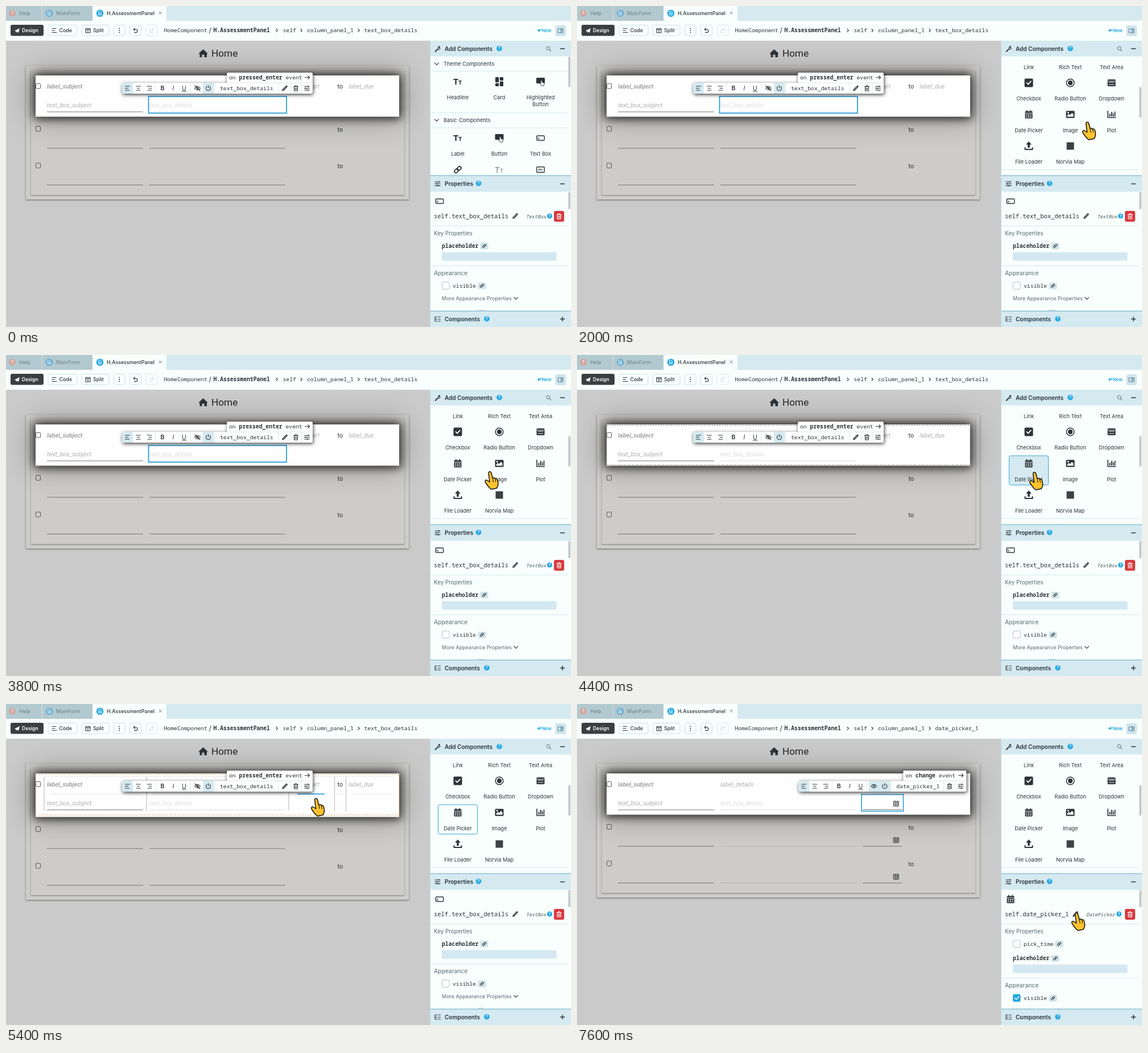
Write an HTML page that moves like this. It is 993 px wide and 564 px high and loops after 8 s.

```html
<!DOCTYPE html>
<html lang="en">
<head>
<meta charset="utf-8">
<title>Form designer</title>
<style>
html,body{margin:0;width:100%;height:100%;overflow:hidden;background:#cacacb}
svg{display:block;width:100vw;height:100vh}
text{font-family:Inter,"Open Sans",sans-serif;font-size:9.2px;fill:#2d3337;white-space:pre}
.m{font-family:"Noto Sans Mono","DejaVu Sans Mono",monospace;font-size:9.75px}
.r{font-family:Roboto,sans-serif;font-size:10.85px}
.i{font-style:italic}
.b{font-weight:600}
.h{font-size:10px;font-weight:600;fill:#263238}
.c{text-anchor:middle}
.s{fill:none;stroke:#2d3337;stroke-width:1.1;stroke-linecap:round;stroke-linejoin:round}
.sh{filter:drop-shadow(1px 2px 3px rgba(0,0,0,.75))}
</style>
</head>
<body>
<svg id="stage" viewBox="0 0 993 564" preserveAspectRatio="none"></svg>
<script>
const INK = '#2d3337', BLUE = '#24a8e2', PALE = '#d5e9f1', PAPER = '#f8fffd';

const text = (x, y, s, cls = '', extra = '') => `<text x="${x}" y="${y}" class="${cls}" ${extra}>${s}</text>`;
const rect = (x, y, w, h, fill, extra = '') => `<rect x="${x}" y="${y}" width="${w}" height="${h}" fill="${fill}" ${extra}/>`;
const line = (x1, y1, x2, y2, color, w = 1, extra = '') =>
  `<path d="M${x1} ${y1}L${x2} ${y2}" stroke="${color}" stroke-width="${w}" fill="none" ${extra}/>`;
const path = (d, extra = '') => `<path d="${d}" class="s" ${extra}/>`;
const solid = (d, fill = INK) => `<path d="${d}" fill="${fill}"/>`;
const disc = (x, y, r, fill, extra = '') => `<circle cx="${x}" cy="${y}" r="${r}" fill="${fill}" ${extra}/>`;
const group = (id, s, extra = '') => `<g id="${id}" ${extra}>${s}</g>`;
const size = n => `style="font-size:${n}px"`;
const tint = (c, n) => `style="fill:${c}${n ? `;font-size:${n}px` : ''}"`;

const bars = (a, b, c) => path(`M${a[0]} -3.5H${a[1]}M${b[0]} 0H${b[1]}M${c[0]} 3.5H${c[1]}`);
const hand = 'M-1 -3Q0 -4 1 -3L1.5 0L5 1.5Q5.5 4 4 6H0L-3 2Q-2.5 1 -1 2Z';
const letters = (color, weight) =>
  text(-8, 5, 'T', '', `style="font-size:13.5px;font-weight:${weight};fill:${color}"`) +
  text(1, 5, 'T', '', `style="font-size:9.5px;font-weight:${weight};fill:${color}"`);
const trash = path('M-4 -3H4M-1.5 -3V-4.5H1.5V-3M-3 -3V4.5H3V-3M-1 -.8V2.5M1 -.8V2.5');

const icons = {
  left: bars([-4, 4], [-4, 1], [-4, 3]),
  center: bars([-4, 4], [-2, 2], [-3.5, 3.5]),
  right: bars([-4, 4], [-1, 4], [-3, 4]),
  eye: path('M-5 0Q0 -6.5 5 0Q0 6.5 -5 0Z') + disc(0, 0, 1.6, 'none', 'class="s"'),
  power: path('M-2.6 -3A4 4 0 1 0 2.6 -3M0 -5V-.5'),
  pencil: solid('M-5 5L-4 1.5L2 -4.5Q4 -5.5 5 -3L-1.5 4Z') + line(-3, 2.5, 2.5, -3, '#fff', .8),
  trash,
  sliders: path('M-4.5 -3.3H4.5M-4.5 0H4.5M-4.5 3.3H4.5M2 -4.4V-2.2M-2 -1.1V1.1M1 2.2V4.4'),
  wrench: path('M-4.5 4.5L1 -1A3 3 0 0 1 4 -4.5L2.5 -2.5L4.5 -1Q3 2 0 1L-3.5 5Z'),
  tree: path('M-4.5 -4V3.5H-1M-4.5 0H-1M-4.5 -4H-1M1 -4H5M1 0H5M1 3.5H5'),
  chain: `<g transform="rotate(-42)">${rect(-7, -2.7, 7.6, 5.4, 'none', 'rx="2.7" class="s" style="stroke-width:1.8"')}${rect(-.6, -2.7, 7.6, 5.4, 'none', 'rx="2.7" class="s" style="stroke-width:1.8"')}</g>`,
  heading: letters(INK, 800),
  rich: letters('#7d8688', 500),
  cards: rect(-7, -8, 6.2, 9, INK, 'rx="1.3"') + rect(.8, -8, 6.2, 6, INK, 'rx="1.3"') +
    rect(-7, 2.5, 6.2, 5.5, INK, 'rx="1.3"') + rect(.8, -.5, 6.2, 8.5, INK, 'rx="1.3"'),
  button: rect(-7.5, -7, 15, 10, INK, 'rx="1.5"') +
    `<path d="${hand}" transform="translate(1.5,1)" fill="${PAPER}" stroke="${INK}" stroke-width=".9"/>`,
  box: rect(-6.7, -4, 13.4, 8, 'none', 'rx="1.2" class="s" style="stroke-width:1.4"') + path('M-4.3 -1V1.3H-2'),
  area: rect(-6.7, -4.7, 13.4, 9.4, 'none', 'rx="1" class="s" style="stroke-width:1.4"') +
    text(0, 1.5, 'abc', 'c b', size(5)),
  check: rect(-7.5, -7.5, 15, 15, INK, 'rx="2"') + path('M-3.5 0L-1 2.7L3.8 -2.7', 'style="stroke:#fff;stroke-width:1.8"'),
  radio: disc(0, 0, 6.8, 'none', `stroke="${INK}" stroke-width="1.5"`) + disc(0, 0, 4.2, INK),
  drop: rect(-7, -6, 14, 12, INK, 'rx="1.5"') + path('M-4.5 -1H4.5M-4.5 3H4.5', 'style="stroke:#fff"') + line(-7, -3, 7, -3, '#fff', .8),
  date: rect(-6.5, -5.5, 13, 12.5, INK, 'rx="1.3"') + line(-3.2, -7.5, -3.2, -4, INK, 1.8) + line(3.2, -7.5, 3.2, -4, INK, 1.8) +
    line(-6.5, -2.2, 6.5, -2.2, '#fff', 1) + line(-4.6, 1, 4.6, 1, '#fff', 1.9, 'stroke-dasharray="2 1.6"') + line(-4.6, 4.4, 4.6, 4.4, '#fff', 1.9, 'stroke-dasharray="2 1.6"'),
  image: rect(-7.5, -6.3, 15, 12.6, INK, 'rx="1.6"') + solid('M-5.5 4V2L-2.5 -1L-.5 1L3 -2.8L5.5 0V4Z', '#fff') + disc(-3.8, -3, 1.4, '#fff'),
  plot: path('M-6.5 -6V5.5H7', 'style="stroke-width:1.6"') + line(-3, 3.7, -3, -1, INK, 2) + line(.3, 3.7, .3, -4.5, INK, 2) +
    line(3.3, 3.7, 3.3, -2, INK, 1.6) + line(6, 3.7, 6, -5, INK, 1.6),
  upload: solid('M0 -8L5 -2.5H1.8V3H-1.8V-2.5H-5Z') + path('M-6.5 3V6H6.5V3', 'style="stroke-width:2"'),
  square: rect(-6.5, -6.5, 13, 13, '#3c4144'),
  spacer: path('M-7 -6.5H7M-7 6.5H7M0 -4V4M-2.5 -2L0 -4.5L2.5 -2M-2.5 2L0 4.5L2.5 2', 'style="stroke-width:1.7"'),
  shapes: solid('M0 -8L5 0H-5Z', '#9b9fa0') + disc(-4, 4, 3.4, '#b4b8b8') + rect(1, .5, 6.5, 6.5, INK),
  clock: disc(0, 0, 6.5, 'none', 'class="s"') + path('M0 -4V0L3 2'),
  grid: path('M-7 -6H7V6H-7ZM-7 -2H7M-7 2H7M-2 -6V6M2.5 -6V6'),
  rows: path('M-6 -6H6V-3H-6ZM-6 -1.5H6V1.5H-6ZM-6 3H6V6H-6Z'),
  calendar: rect(-4.3, -3.8, 8.6, 8.3, '#eee', 'class="s" style="fill:none;stroke-width:1"') + path('M-4 -1.6H4M-4 1.4H4M-1.4 -1.6V4.3M1.4 -1.6V4.3M-2.3 -5V-3M2.3 -5V-3', 'style="stroke-width:.9"')
};
const icon = (name, x, y, k = 1) => `<g transform="translate(${x},${y}) scale(${k})">${icons[name]}</g>`;
const help = (x, y, fill = BLUE, r = 4.8) => disc(x, y, r, fill) + text(x, y + 2.6, '?', 'c b', tint('#fff', 7.5));
const chip = (x, y) => rect(x - 7, y - 5.5, 14, 11.5, '#d0e3ea', 'rx="2.5"') + icon('chain', x, y, .52);
const chevron = (x, y) => path(`M${x - 3.5} ${y - 1.7}l3.5 3.5l3.5 -3.5`);

function topBar() {
  const tabIcon = (x, c) => disc(x, 12.7, 6.3, c) + path(`M${x - 2.3} 9.2h3l1.7 1.7v5h-4.7zM${x - 1} 12.5h2M${x - 1} 14.2h2`, 'style="stroke:#fff;stroke-width:.8"');
  const button = (x, w, s = '') => rect(x, 33.5, w, 18.5, PAPER, `rx="3" stroke="#d3dfe1" ${s}`);
  const arrow = (x, f, c) => `<g transform="translate(${x},43) scale(${f},1)">${path('M-1 -4L-3.3 -1.8L-1 .4M-3 -1.8H1Q3.5 -1.5 3.5 1Q3.5 3.6 .5 3.6H-2', `style="stroke:${c}"`)}</g>`;
  return rect(0, 0, 993, 26, PALE) + rect(0, 0, 152, 26, '#b3c9d0') + line(63.5, 0, 63.5, 26, '#d5e2e6') +
    rect(152, 0, 130, 27, PAPER) + rect(0, 26, 993, 35, PAPER) +
    help(11, 12.7, '#d2a79f', 6) + text(23.5, 16, 'Help', '', tint('#6b818a', 8.8)) +
    tabIcon(76, '#68add0') + text(88, 16, 'MainForm', '', tint('#6b818a', 9)) +
    tabIcon(165, BLUE) + text(177, 16, 'H.AssessmentPanel', '', 'style="font-size:8.8px;font-weight:500"') +
    path('M269 10l4.4 4.4M273.400 10l-4.400 4.400', 'style="stroke-width:.9;stroke:#63717a"') +
    rect(8, 33, 58, 19.5, '#3b3e40', 'rx="3"') + solid('M15 43.500L24 39L22 47L19 45L18 47.500L17.500 44.500Z', '#fff') +
    text(28, 46, 'Design', 'b', tint('#fff', 8.5)) +
    button(74, 51) + path('M81 39.500H88M81 43H86M81 46.500H89') + text(93.5, 46, 'Code', '', 'style="font-weight:500;font-size:8.9px"') +
    button(133, 48) + path('M140 39.500H148V47H140ZM140 41.500H148M144 41.500V47') + text(153, 46, 'Split', '', 'style="font-weight:500;font-size:8.9px"') +
    button(189.5, 19.5) + [39.5, 43, 46.5].map(y => disc(199.3, y, .9, INK)).join('') +
    button(217.5, 20) + arrow(227.5, 1, INK) + button(246, 20, 'opacity=".7"') + arrow(256, -1, '#d5dfe2') +
    text(277.5, 46, 'HomeComponent', 'm') + text(356.5, 47, '/', '', size(12)) + text(364.5, 46, 'H.AssessmentPanel', 'm b') +
    [[486.5, 'self'], [529, 'column_panel_1']].map(([x, s]) => text(x, 46, s, 'm')).join('') +
    [476, 519, 620].map(x => path(`M${x - 1} 40.300l2.300 2.500l-2.300 2.500`)).join('') +
    group('crumb0', text(629.5, 46, 'text_box_details', 'm')) + group('crumb1', text(629.5, 46, 'date_picker_1', 'm')) +
    solid('M936.500 39.500L937.500 42L940 43L937.500 44L936.500 46.500L935.500 44L933 43L935.500 42ZM940 40l.6 1.300l1.300 .6l-1.300 .6l-.6 1.300l-.6 -1.300l-1.300 -.6l1.300 -.6Z', BLUE) +
    text(942, 46, 'New', 'b', tint(BLUE, 7.6)) +
    rect(965.5, 34, 18.5, 19, '#cfe4ec', 'rx="3"') + path('M970.500 40H979V47H970.500ZM975.500 40V47M976.500 42H978M976.500 44H978', 'style="stroke:#4b7486;stroke-width:.9"');
}

function toolbar(id, x, w, name, event, eventW, eyeOn) {
  const end = x + w, y = 144.5;
  const sep = sx => line(sx, 135, sx, 154, '#dfe6e8');
  const mark = (ix, s, extra) => text(x + ix, 148, s, 'c', `style="font-size:10.5px;${extra}"`);
  const nameTail = eyeOn ? end - 40 : end - 60;
  return group(id, `<g class="sh">${rect(end - eventW, 117, eventW, 22, '#fff', 'rx="2.5"')}${rect(x, 135, w, 19, '#fff', 'rx="3"')}</g>` +
    line(end - eventW, 135, end, 135, '#d6dde0', .8) +
    rect(x, 135, 19, 19, PALE, 'rx="2"') + rect(x + (eyeOn ? 123.5 : 142), 135, eyeOn ? 38 : 19.5, 19, PALE) +
    icon('left', x + 9.5, y) + icon('center', x + 28.5, y) + icon('right', x + 48, y) + sep(x + 59) +
    mark(71, 'B', 'font-weight:600') + mark(90, 'I', 'font-style:italic;font-family:"Noto Serif",serif') + mark(109, 'U', 'text-decoration:underline') +
    sep(x + 120) + icon('eye', x + 132.5, y) + (eyeOn ? '' : path(`M${x + 128} 140l9 9`)) + icon('power', x + 151.5, y) + sep(x + 163) +
    text(x + 172, 148, name, 'm', 'font-weight="500"') + sep(nameTail) + (eyeOn ? '' : icon('pencil', end - 49, y) + sep(end - 39)) +
    icon('trash', end - 29.5, y) + sep(end - 20) + icon('sliders', end - 10, y) +
    text(end - eventW + 4, 129, `on <tspan font-weight="600">${event}</tspan> event`, 'm') +
    path(`M${end - 13.5} 125.500h8m-2.800 -2.800l2.800 2.800l-2.800 2.800`));
}

function form() {
  const tick = y => rect(52.5, y, 8, 8.5, 'none', 'rx="1" stroke="#555"');
  const lower = [250, 314.5].map(y => tick(y - 38.5) + text(582.5, y - 29.5, 'to', 'r') + line(72, y, 241, y, '#777')).join('');
  const gray = (x, y, s, c = '#b2b2b2', cls = '') => text(x, y, s, 'r i ' + cls, tint(c));
  const dashes = (c, bottom) => rect(52, 123.5, 639, bottom - 123.5, 'none', `stroke="${c}" stroke-width=".9" stroke-dasharray="2.5 2"`);
  return rect(0, 61, 745, 503, '#cacacb') + solid('M346.500 76L354.500 83.500L353 84.500V90H348.500V85.500H344.500V90H340.500V84.500L338.500 83.500Z') +
    text(361, 89, 'Home', 'r', tint('#222', 17.2)) +
    rect(35, 105, 673, 235, '#cdccc9', 'id="outer" style="filter:drop-shadow(0 1px 1.500px #666)"') +
    rect(43.5, 113, 656.5, 219, '#cdccc9', 'id="inner" style="filter:drop-shadow(0 1px 1.200px #777)"') +
    group('lower', lower + group('lines0', line(252, 250, 490.5, 250, '#777') + line(252, 314.5, 490.5, 314.5, '#777')) +
      group('lines1', [250, 314.5].map(y => line(252, y, 492, y, '#b2b2b0') + line(502, y, 571, y, '#777') + icon('calendar', 561, y - 11)).join(''))) +
    rect(47, 118, 649, 82, '#000', 'id="glow" opacity=".3" style="filter:blur(25px)"') +
    rect(49, 119, 645, 79, '#000', 'id="dark" opacity=".82" style="filter:blur(8px)"') +
    rect(52, 122, 639, 72.500, '#fefefe', 'id="row"') + tick(136.5) +
    gray(72, 145, 'label_subject', '#a5a5a5', 'b') + gray(252, 145, 'label_details') + gray(502, 145, 'label_start') +
    text(582.5, 145, 'to', 'r') + gray(602, 145, 'label_due') +
    gray(72, 178, 'text_box_subject') + line(72, 186, 241, 186, '#777') + gray(252, 178, 'text_box_details', '#dedede') + line(252, 186, 490.5, 186, '#ddd') +
    group('dash', dashes('#777', 193)) +
    group('columns', dashes('#d99a52', 195) + [67, 247, 497, 577.5, 597.5].map(x => line(x, 128, x, 188, '#b5b5b5')).join('') +
      [[77, 237], [257, 487], [580, 592], [607, 681]].map(([a, b]) => line(a, 158, b, 158, '#e3e3e3')).join('') + line(67, 127.5, 681, 127.5, '#e6e6e6', .7)) +
    group('target', line(512, 158.2, 560, 158.2, '#2aa5dc', 1.8)) +
    group('select0', rect(250.5, 158.8, 242.5, 29.500, 'none', 'stroke="#2a9fda" stroke-width="1.8"')) +
    group('select1', rect(582, 160, 70, 20, '#fefefe') + rect(500, 158.8, 73.500, 29.500, '#fff', 'stroke="#2a9fda" stroke-width="1.6"') +
      line(502, 185.5, 571, 185.5, '#777', 1, 'id="under"') + icon('calendar', 561, 175)) +
    toolbar('bar0', 204, 335, 'text_box_details', 'pressed_enter', 151, false) +
    toolbar('bar1', 353, 295, 'date_picker_1', 'change', 111, true);
}

function palette() {
  const cols = [794, 867, 939.5];
  const section = (y, s) => chevron(757, y) + text(769, y + 3.3, s, '', size(9.3));
  const row = (y, items) => items.map(([name, s], i) => icon(name, cols[i], y) +
    s.split('|').map((part, j) => text(cols[i], y + 31 + j * 12, part, 'c')).join('')).join('');
  const rule = y => line(746, y, 988, y, '#dbe8eb');
  return section(101.5, 'Theme Components') + rule(114.5) + row(133, [['heading', 'Headline'], ['cards', 'Card'], ['button', 'Highlighted|Button']]) +
    rule(187.5) + section(200.5, 'Basic Components') + rule(214) +
    rect(759.5, 385, 69, 51.5, PALE, `id="card" rx="3" stroke="#3ba7d3"`) +
    [[['heading', 'Label'], ['button', 'Button'], ['box', 'Text Box']],
     [['chain', 'Link'], ['rich', 'Rich Text'], ['area', 'Text Area']],
     [['check', 'Checkbox'], ['radio', 'Radio Button'], ['drop', 'Dropdown']],
     [['date', 'Date Picker'], ['image', 'Image'], ['plot', 'Plot']],
     [['upload', 'File Loader'], ['square', 'Norvia Map']]].map((items, i) => row(232 + i * 55.5, items)).join('') +
    rule(495.5) + section(508.5, 'More Components') + rule(522.5) +
    row(540.5, [['square', 'Vidorra Video'], ['spacer', 'Spacer'], ['shapes', 'Canvas']]) +
    row(596, [['clock', 'Timer'], ['grid', 'Data Grid'], ['rows', 'Repeater']]);
}

function properties() {
  const checkbox = (y, on) => rect(766.5, y - 6.500, 12.500, 12.500, on ? BLUE : '#fff', `rx="2" stroke="${on ? BLUE : '#b5c3c7'}"`) +
    (on ? path(`M769.500 ${y}l2.500 2.500l4.500 -5`, 'style="stroke:#fff;stroke-width:1.500"') : '');
  const head = (id, ic, name, pen, type, tx, hx) => group(id, icon(ic, 762, 343) + text(752, 373, name, 'm', size(10.4)) +
    icon('pencil', pen, 369) + text(tx, 372.5, type, 'm i', tint('#4b565b', 8.4)) + help(hx, 369, BLUE, 4.5));
  return head('head0', 'box', 'self.text_box_details', 895, 'TextBox', 914, 955.5) +
    head('head1', 'date', 'self.date_picker_1', 876, 'DatePicker', 895, 952.5) +
    rect(963, 360, 18, 19, '#d73b41', 'rx="3"') + `<g style="filter:invert(1) brightness(2)">${icon('trash', 972, 369.5)}</g>` +
    line(746, 386.5, 988, 386.5, '#dbe8eb') + text(752, 403, 'Key Properties', '', tint('#5d6a70', 9.8)) +
    group('pick', checkbox(421.5) + text(785, 425, 'pick_time', 'm') + chip(847.5, 421.5)) +
    group('rest', text(766, 425, 'placeholder', 'm b') + chip(840.5, 421.5) + rect(766, 432.500, 201.500, 15, '#d4e8f1', 'rx="2"') +
      line(746, 456.5, 988, 456.5, '#dbe8eb') + text(752, 473, 'Appearance', '', tint('#5d6a70', 10.3)) +
      group('off', checkbox(491.5)) + group('on', checkbox(491.5, true)) + text(785, 494.5, 'visible', 'm') + chip(836.5, 491.5) +
      text(766, 517, 'More Appearance Properties', '', tint('#5d6a70', 9)) + chevron(896, 513.5) + chip(835, 539));
}

function panel() {
  const header = (y, h, ic, s, hx) => rect(745, y, 248, h, PALE) + icon(ic, 758.5, y + 14.3) + text(771, y + 17.8, s, 'h') + help(hx, y + 13.7);
  const sign = (y, plus) => path(`M974.500 ${y}h7` + (plus ? 'm-3.500 -3.500v7' : ''), 'style="stroke-width:1.500"');
  return rect(745, 61, 248, 503, PAPER) +
    `<g clip-path="url(#list)">${group('scroll', palette())}</g>` + rect(988.3, 89, 3.700, 53.500, '#c3c6c6', 'id="thumb" rx="1.500"') +
    `<g clip-path="url(#props)">${properties()}</g>` + rect(988.3, 327, 3.700, 30, '#c3c6c6', 'rx="1.500"') +
    header(61, 27.5, 'wrench', 'Add Components', 867) + header(298, 28.5, 'sliders', 'Properties', 830.5) + header(536, 28, 'tree', 'Components', 845) +
    line(745, 298, 993, 298, '#8fc3d2', 1.3) + line(745, 536, 993, 536, '#8fc3d2', 1.3) + line(745.5, 61, 745.5, 564, '#c5d8dc', .8) +
    disc(953, 74.3, 3, 'none', 'stroke="#607078"') + path('M955.300 76.600l2.500 2.500', 'style="stroke:#607078"') +
    sign(75) + sign(312.5) + sign(550, true);
}

const pointer = `<path d="M-2.500 2Q-1 -1.500 2 1L5 11.500Q8 9.500 9.500 12.500Q12.500 11 13.500 15L14.500 21Q14.500 25 12 29L2.500 31Q-1 28.500 -4 24.500L-8 18.500Q-9.500 14 -5 15L-.5 18Z" fill="#ffc22e" stroke="#111" stroke-width="1.500" stroke-linejoin="round"/>` +
  path('M5 12L6 18M9.500 13L10.300 18', 'style="stroke:#111"');

const stage = document.getElementById('stage');
stage.innerHTML = '<defs><clipPath id="list"><path d="M745 89H988V297H745Z"/></clipPath><clipPath id="props"><path d="M745 327H988V536H745Z"/></clipPath></defs>' +
  form() + topBar() + panel() + group('pointer', pointer);

const el = {};
stage.querySelectorAll('[id]').forEach(n => el[n.id] = n);
const show = (id, on) => el[id].setAttribute('display', on ? 'inline' : 'none');
const move = (id, x, y) => el[id].setAttribute('transform', `translate(${x},${y})`);

// Keys are [time, ...values]; values ease between neighbouring keys.
function track(keys, t) {
  const n = keys.findIndex(k => k[0] > t);
  if (n === 0) return keys[0].slice(1);
  if (n < 0) return keys[keys.length - 1].slice(1);
  const [a, b] = [keys[n - 1], keys[n]];
  const u = (t - a[0]) / (b[0] - a[0]), e = u * u * (3 - 2 * u);
  return a.slice(1).map((v, i) => v + (b[i + 1] - v) * e);
}
const scrollKeys = [[900, 0], [1200, 66], [1600, 139], [2000, 208], [2400, 277], [2800, 346], [3000, 346], [3200, 277], [3400, 277], [3600, 208]];
const pointerKeys = [[200, 700, 470], [1000, 897, 204], [3400, 897, 204], [4200, 804, 206], [4400, 804, 206], [5400, 545, 166], [6600, 545, 166], [7600, 878, 367]];

function draw(t) {
  const placed = t >= 6000, over = t >= 5000 && !placed, grow = over ? 4 : 0;
  const [scroll] = track(scrollKeys, t), [px, py] = track(pointerKeys, t);
  move('scroll', 0, -scroll);
  move('thumb', 0, scroll * .257);
  move('pointer', px, py);
  show('pointer', t >= 200);
  show('card', t >= 4000 && !placed);
  el.card.setAttribute('fill', t < 4600 ? PALE : PAPER);

  el.outer.setAttribute('height', 235 + grow);
  el.inner.setAttribute('height', 219 + grow);
  el.row.setAttribute('height', 72.5 + grow);
  el.glow.setAttribute('height', 82 + grow);
  el.dark.setAttribute('height', 79 + grow);
  move('lower', 0, grow);
  show('dash', (t >= 4400 && !over && !placed) || (placed && t < 6400));
  show('columns', over);
  show('target', over && t >= 5200);
  show('select0', t < 4400);
  for (const id of ['crumb', 'lines', 'bar', 'head']) {
    show(id + 0, !placed);
    show(id + 1, placed);
  }
  show('select1', placed);
  const hover = t < 6800;
  el.under.setAttribute('stroke', hover ? '#111' : '#777');
  el.under.setAttribute('stroke-width', hover ? 1.8 : 1);
  move('bar1', t < 6400 ? 0 : 36.3, 0);
  show('pick', placed);
  show('on', placed);
  show('off', !placed);
  move('rest', 0, placed ? 25.3 : 0);
}

const STEP = 200, LOOP = 8000, start = performance.now();
function tick() {
  const t = (performance.now() - start) % LOOP;
  draw(Math.floor(t / STEP) * STEP);
  requestAnimationFrame(tick);
}
tick();
</script>
</body>
</html>
```
